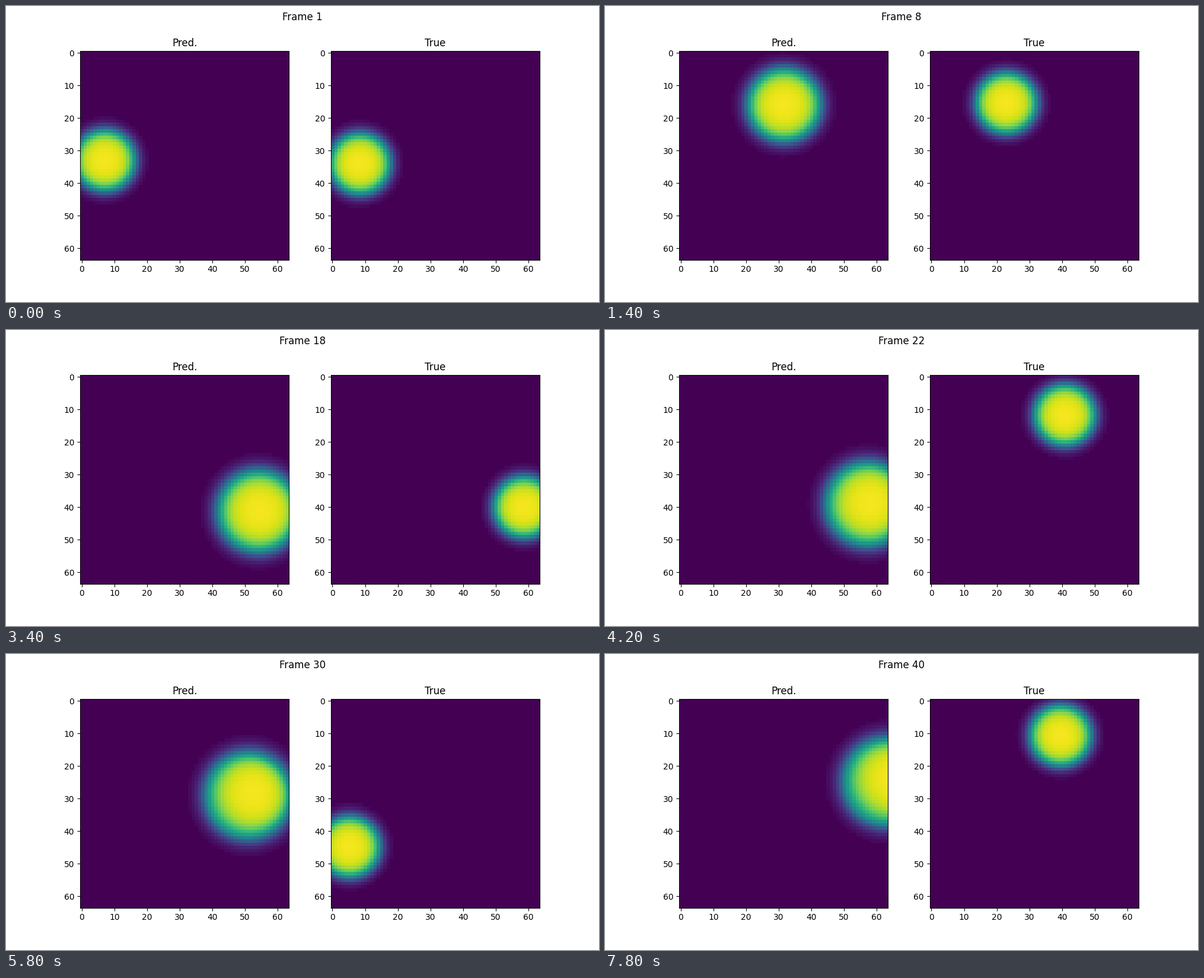
These frames come from a looping animation (1000x500 px, 8000 ms). A matplotlib script:

```python
import numpy as np
import matplotlib.pyplot as plt
from matplotlib.animation import FuncAnimation

SIZE = 64
FRAMES = 40
WALL = SIZE - 1
BALL_RADIUS = 9.1
FLOOR = 0.018

cols, rows = np.meshgrid(np.arange(SIZE), np.arange(SIZE))

# Turning points of the predicted ball: step, x, y
KEYS = np.array([(1, 7, 33), (4, 5, 11), (8, 31.6, 16), (13, 45, 36.4),
                 (22, 57.2, 39), (30, 51, 29), (34, 42, 24),
                 (37, 45.4, 23), (40, 63.2, 24.8)])


def bounce(v):
    """Fold a straight path back and forth between the walls."""
    return WALL - abs(v % (2 * WALL) - WALL)


def smooth_path(step):
    """Cubic Hermite interpolation through KEYS."""
    t, points = KEYS[:, 0], KEYS[:, 1:]
    slopes = np.gradient(points, t, axis=0)
    i = min(np.searchsorted(t, step, side="right") - 1, len(t) - 2)
    h = t[i + 1] - t[i]
    s = (step - t[i]) / h
    return ((1 + 2 * s) * (1 - s) ** 2 * points[i]
            + s * (1 - s) ** 2 * h * slopes[i]
            + s * s * (3 - 2 * s) * points[i + 1]
            + s * s * (s - 1) * h * slopes[i + 1])


def blob(x, y, radius, skew=0):
    """Soft disc; skew moves its peak right and up but keeps the rim."""
    dx, dy = cols - x, rows - y
    inside = np.clip(1 - (dx ** 2 + dy ** 2) / radius ** 2, 0, 1)
    dist = np.hypot(dx - skew * inside, dy + skew / 2 * inside)
    level = 1 / (1 + np.exp(4.2 * ((dist / radius) ** 1.7 - 1)))
    return np.where(level < FLOOR, 0, level)


def true_image(step):
    x = bounce(-8.3 + 4.455 * (step - 1))
    y = bounce(-34 + 7.06 * (step - 1))
    return blob(x, y, BALL_RADIUS)


def pred_image(step):
    x, y = smooth_path(step)
    radius = BALL_RADIUS + 3.9 * (1 - np.exp((1 - step) / 12))
    return blob(x, y, radius, skew=np.clip((step - 13) / 10, 0, 2))


fig, axes = plt.subplots(1, 2, figsize=(10, 5), dpi=100)
heading = fig.suptitle("Frame 1")
views = []
for ax, title, make in zip(axes, ("Pred.", "True"), (pred_image, true_image)):
    ax.set_title(title)
    views.append((ax.imshow(make(1), cmap="viridis", vmin=0, vmax=1), make))


def update(i):
    step = i + 1
    heading.set_text(f"Frame {step}")
    for image, make in views:
        image.set_data(make(step))
    return [heading, *(image for image, _ in views)]


anim = FuncAnimation(fig, update, frames=FRAMES, interval=200,
                     repeat=True, repeat_delay=0, blit=False)
plt.show()
```
